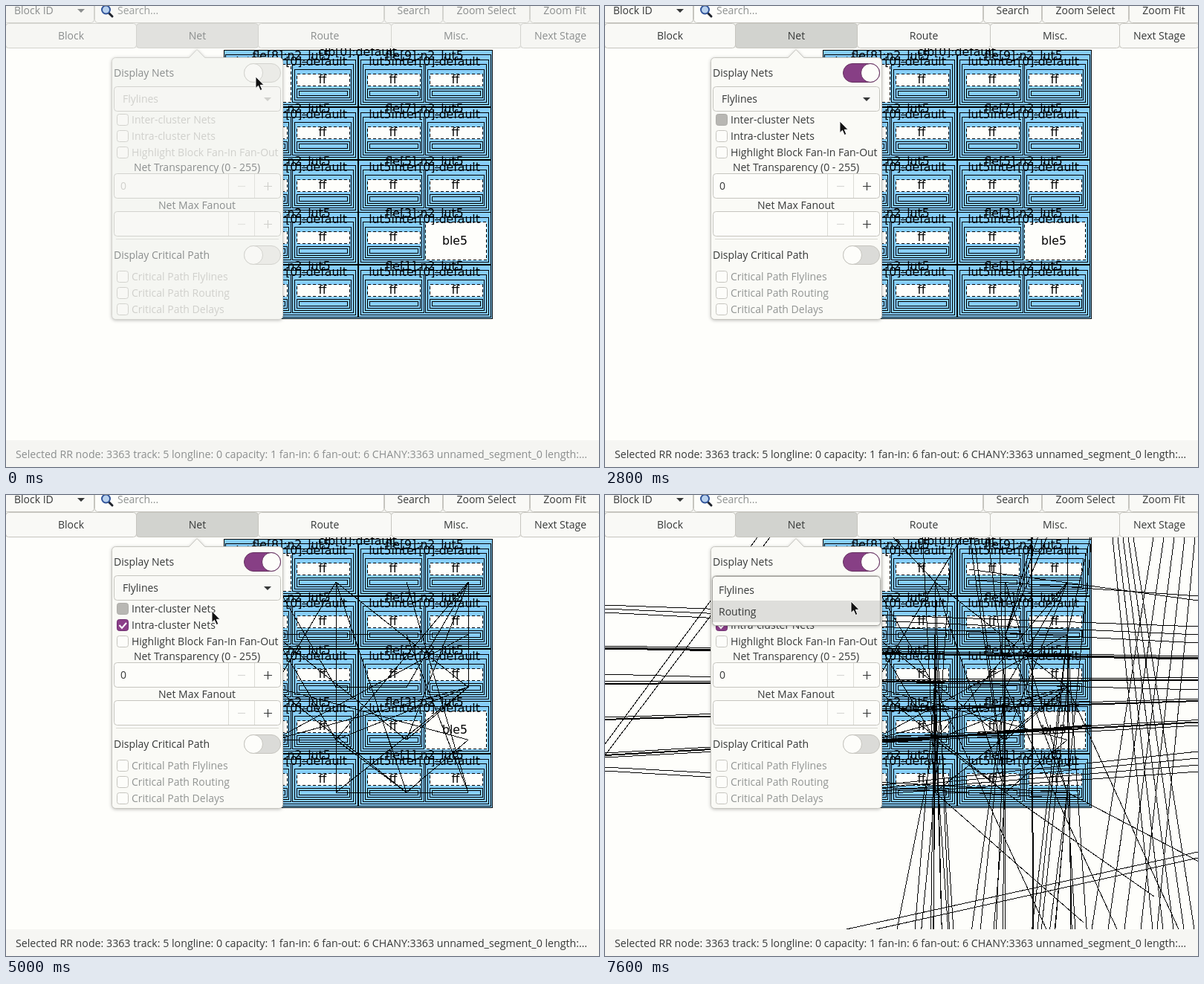
Animation, 798 px wide and 620 px high, one loop 8 s. Source, as an HTML page:

```html
<!DOCTYPE html>
<html lang="en">
<head>
<meta charset="utf-8">
<title>Net display options</title>
<style>
html, body { margin: 0; width: 100%; height: 100%; overflow: hidden; background: #fefefb; }
svg { display: block; width: 100vw; height: 100vh; }
text { font: 14px "Open Sans", "Noto Sans", sans-serif; fill: var(--fg); white-space: pre; }
.status { font-size: 14.2px; }
.block text { font: 15.7px "DejaVu Sans", sans-serif; fill: #000; text-anchor: middle; }
.block rect { fill: #87cefa; stroke: #000; }
.block .leaf { fill: #fefefb; stroke-dasharray: 4 3; }
.block rect, .wires { shape-rendering: crispEdges; }
.wires { fill: none; stroke: #000; }
.mid { text-anchor: middle; }
.bar { fill: var(--bar); }
.btn { fill: var(--btn); stroke: var(--line); }
.field { fill: var(--field); stroke: var(--line); }
.rule { stroke: var(--line); opacity: .6; }
.hint { fill: var(--hint); }
.opt { fill: var(--opt); }
.dis { fill: var(--dis); }
.sign { fill: none; stroke: var(--opt); stroke-width: 1.2; }
.faint { fill: none; stroke: var(--faint); stroke-width: 1.2; }
.arrow { fill: var(--fg); }
.shade { filter: drop-shadow(0 1px 2px rgba(0,0,0,.25)); }
</style>
</head>
<body>
<script>
const NS = 'http://www.w3.org/2000/svg';
const LOOP = 8000;

function add(parent, tag, attrs = {}, text) {
  const node = document.createElementNS(NS, tag);
  for (const key in attrs) node.setAttribute(key, attrs[key]);
  if (text !== undefined) node.textContent = text;
  parent.appendChild(node);
  return node;
}
const group = (parent, cls = '') => add(parent, 'g', { class: cls });
const path = (parent, d, cls) => add(parent, 'path', { d, class: cls });
const label = (parent, x, y, text, cls = '') => add(parent, 'text', { x, y, class: cls }, text);
const box = (parent, x, y, width, height, cls = '', rx = 0) =>
  add(parent, 'rect', { x: x + .5, y: y + .5, width, height, class: cls, rx });
const repeat = (n, fn) => { for (let i = 0; i < n; i++) fn(i); };

const svg = add(document.body, 'svg', { viewBox: '0 0 798 620', preserveAspectRatio: 'none' });
add(svg, 'rect', { width: 798, height: 620, fill: '#fefefb' });

// Nested logic blocks: two columns of five, two cells in each
const PITCH = 70.75;
const block = group(svg, 'block');

function cell(x, y, whole) {
  if (whole) {
    box(block, x, y, 82, 51, 'leaf');
    label(block, x + 40, y + 31, 'ble5');
    return;
  }
  box(block, x, y, 82, 51);
  box(block, x + 3, y + 7, 76, 41);
  box(block, x + 6, y + 13, 71, 16, 'leaf');
  box(block, x + 6, y + 33, 71, 12);
  box(block, x + 9, y + 36, 65, 6);
  label(block, x + 41, y + 26, 'ff');
}

const eachBlock = fn => repeat(10, i => fn(i % 2, i >> 1, Math.round(65 + (i >> 1) * PITCH)));

box(block, 293, 59, 361, 361);
eachBlock((col, row, y) => {
  const x = 295 + col * 179;
  box(block, x, y, 178, 70);
  box(block, x + 3, y + 7, 172, 60);
  cell(x + 6, y + 13, col === 0 && row === 0);
  cell(x + 90, y + 13, col === 1 && row === 3);
});
eachBlock((col, row, y) => {
  const x = 384 + col * 179;
  label(block, x, y + 7, `fle[${8 - 2 * row + col}]:n2_lut5`);
  label(block, x, y + 15, 'lut5inter[0]:default');
});
label(block, 473, 67, 'clb[0]:default');

// Flylines between pins and out to other clusters
let seed = 11;
const rnd = () => (seed = (seed * 16807) % 2147483647) / 2147483647;
const span = (a, b) => a + rnd() * (b - a);
const cellX = i => 361 + i * 83 + (i > 1 ? 12 : 0);
const rowY = i => 117 + i * PITCH;
const pin = (from = 0) => [cellX(from + Math.floor(rnd() * (4 - from))), rowY(Math.floor(rnd() * 5))];

const inter = group(svg, 'wires');
const intra = group(svg, 'wires');
const wire = (parent, [x1, y1], [x2, y2], w = 1) =>
  add(parent, 'line', { x1, y1, x2, y2, 'stroke-width': w });
const across = (left, right, w) => wire(inter, [0, left], [798, right], w);

repeat(4, i => {
  const left = 206 + 48 * i;
  const right = 220 + 28.5 * i;
  across(left, right, i ? 2 : 3);
  across(left - 3, right - 3);
});
repeat(3, i => across(148 + 5 * i, 177 + 11 * i));
across(241, 262);
across(353, 310);
repeat(2, i => {
  wire(inter, [0, 366 + 5 * i], [cellX(3), 400 + 8 * i]);
  wire(inter, [0, 335 + 15 * i], [205 + 17 * i, 57]);
  wire(inter, [325 + 40 * i, 584], [798, 480 + 8 * i]);
  wire(inter, [490 + 10 * i, 100 + 15 * i], [798, 142 - 6 * i]);
});
wire(inter, [373, 332], [655, 310], 3);
wire(inter, [574, 57], [576, 584], 2);

repeat(4, i => wire(inter, [373, 390 + 4 * i], [798, 345 + 9 * i]));
repeat(28, () => {
  const [x, y] = pin(1);
  wire(inter, [x, y], [Math.max(393, x + span(-55, 35)), 584]);
});
repeat(14, () => {
  const [x, y] = pin(1);
  wire(inter, [x, y], [x + span(-60, 60), 57]);
});
repeat(3, i => {
  const x = cellX(i + 1);
  wire(inter, [x, 400], [x + 200, 575 - 35 * i]);
  wire(inter, [x, 258], [x + 150, 584]);
});
repeat(5, i => {
  wire(inter, [683 + 7 * i, 57], [737 + 14 * i, 584]);
  wire(inter, [738 + 14 * i, 57], [655 + 22 * i, 584]);
});
repeat(30, () => wire(intra, pin(), pin()));

// Toolbar and status line
add(svg, 'rect', { width: 798, height: 57, class: 'bar' });
const cells = (edges, y, h, inset) => edges.slice(1).map((x, i) =>
  box(svg, edges[i], y, x - edges[i] - inset, h, 'btn', 4));
const topRow = cells([-3, 119, 509, 588, 705, 802], -10, 32, 1);
topRow[1].setAttribute('class', 'field');
const tabs = cells([-1, 175, 339, 518, 692, 799], 23, 33, 0);
tabs[1].style.fill = 'var(--tab)';
label(svg, 11, 11, 'Block ID');
path(svg, 'M96 4h10l-5 5z', 'arrow');
add(svg, 'path', { d: 'M138 9l5 5', stroke: '#20242c', 'stroke-width': 3, 'stroke-linecap': 'round' });
add(svg, 'circle', { cx: 134.5, cy: 5, r: 5.5, fill: '#b9d2ee', stroke: '#31549a', 'stroke-width': 2 });
label(svg, 150, 11, 'Search...', 'hint');

function caption(rect, y, text) {
  const mid = +rect.getAttribute('x') + rect.getAttribute('width') / 2;
  label(svg, Math.min(mid, 752), y, text, 'mid');
}
['Search', 'Zoom Select', 'Zoom Fit'].forEach((s, i) => caption(topRow[i + 2], 11, s));
['Block', 'Net', 'Route', 'Misc.', 'Next Stage'].forEach((s, i) => caption(tabs[i], 45, s));
add(svg, 'rect', { y: 584, width: 798, height: 36, class: 'bar' });
label(svg, 13, 608, 'Selected RR node: 3363 track: 5 longline: 0 capacity: 1 fan-in: 6 fan-out: 6 ' +
  'CHANY:3363 unnamed_segment_0 length:…', 'status');

// Popover
const pop = group(svg);
const sheet = path(pop, 'M147.500 69.500H246.500L257 58.500L267.500 69.500H367.500a5 5 0 0 1 5 5V416.500' +
  'a5 5 0 0 1-5 5H147.500a5 5 0 0 1-5-5V74.500a5 5 0 0 1 5-5z', 'shade');
sheet.style.cssText = 'fill:var(--pop);stroke:var(--line)';

function toggle(y, fill, edge) {
  const ring = add(pop, 'rect', { x: 318, y: y - 15, width: 54, height: 30, rx: 15,
    fill: 'none', stroke: '#e9b698', 'stroke-width': 3, opacity: 0 });
  const back = box(pop, 320, y - 13, 49, 25, '', 12.5);
  back.style.cssText = `fill:var(${fill});stroke:var(${edge})`;
  const knob = add(pop, 'circle', { cx: 333, cy: y, r: 12.5 });
  knob.style.cssText = `fill:var(--field);stroke:var(${edge})`;
  return { ring, knob };
}

function check(y, text, cls) {
  const mark = box(pop, 149, y - 8, 15, 15, 'field', 3);
  const tick = add(pop, 'path', { d: `M152.500 ${y}l3.500 4l6-7`, fill: 'none', stroke: '#fff',
    'stroke-width': 2, opacity: 0 });
  label(pop, 169, y + 5, text, cls);
  return { mark, tick };
}

function spin(y, value) {
  box(pop, 145, y - 17, 224, 33, 'field', 4);
  path(pop, `M299.500 ${y - 16}v32M334.500 ${y - 16}v32`, 'rule');
  path(pop, `M312 ${y + .5}h10`, 'faint');
  path(pop, `M347 ${y + .5}h11M352.500 ${y - 5}v11`, 'sign');
  label(pop, 154, y + 5, value, 'opt');
}

label(pop, 145, 95, 'Display Nets');
const netSwitch = toggle(90, '--track', '--edge');
box(pop, 145, 108, 224, 33, 'btn', 4);
label(pop, 157, 130, 'Flylines', 'opt');
path(pop, 'M347 123h10l-5 5z', 'opt');
const [interCheck, intraCheck] = ['Inter-cluster Nets', 'Intra-cluster Nets', 'Highlight Block Fan-In Fan-Out']
  .map((s, i) => check(153 + 22 * i, s, 'opt'));
label(pop, 257, 222, 'Net Transparency (0 - 255)', 'mid');
spin(242, '0');
label(pop, 257, 273, 'Net Max Fanout', 'mid');
spin(293, '');
path(pop, 'M148 313.500H367', 'rule');
label(pop, 145, 340, 'Display Critical Path');
toggle(335, '--off', '--line');
['Flylines', 'Routing', 'Delays'].forEach((s, i) => check(364 + 22 * i, 'Critical Path ' + s, 'dis'));

// Drop-down list
const menu = group(svg);
const list = box(menu, 144, 109, 226, 66, 'shade', 4);
list.style.cssText = 'fill:#fafaf6;stroke:#a3a29d';
const hover = add(menu, 'rect', { x: 145, width: 225, height: 29, fill: '#dededb' });
['Flylines', 'Routing'].forEach((s, i) => label(menu, 153, 133 + 29 * i, s));

const cursor = add(svg, 'path', { d: 'M0 0V15.500L3.500 12.300L6.200 18.500L8.800 17.400L6.200 11.300H11z',
  fill: '#111', stroke: '#fff', 'stroke-width': .9 });

// Pointer moves: begin, end, x, y reached
const moves = [
  [700, 1100, 380, 92], [1200, 1600, 345, 103], [1600, 1800, 338, 128], [2500, 2800, 316, 155],
  [3000, 3800, 297, 155], [4000, 4300, 275, 168], [4700, 5100, 277, 152], [6200, 6600, 345, 95],
  [6900, 7200, 333, 123], [7300, 7600, 331, 143]
];

const ramp = (t, a, b) => Math.min(1, Math.max(0, (t - a) / (b - a)));
const rgb = hex => [1, 3, 5].map(i => parseInt(hex.slice(i, i + 2), 16));
const mix = (a, b, k) => '#' + rgb(a).map((v, i) =>
  Math.round(v + (rgb(b)[i] - v) * k).toString(16).padStart(2, '0')).join('');

const place = t => moves.reduce(([x, y], [begin, end, toX, toY]) => {
  const k = ramp(t, begin, end);
  return [x + (toX - x) * k, y + (toY - y) * k];
}, [336, 95]).map(Math.round);

function paint(focus, on) {
  const tone = (a, b) => mix(a, b, focus);
  const fg = tone('#8b8e8e', '#363838');
  const dis = tone('#d0d0cc', '#929593');
  const off = tone('#ebebe7', '#dbdbd8');
  const line = tone('#d3d3ce', '#c6c5bf');
  const vars = {
    fg, dis, off, line,
    opt: mix(dis, fg, on),
    track: mix(off, '#873f85', on),
    edge: mix(line, '#65305f', on),
    hint: tone('#9b9e9d', '#8e9190'),
    faint: tone('#e2e2de', '#d8d8d4'),
    bar: tone('#f5f5f2', '#f6f6f3'),
    btn: tone('#f6f6f3', '#f9f9f6'),
    tab: tone('#e1e1de', '#d2d3cf'),
    field: tone('#f8f8f5', '#fdfdfa'),
    pop: tone('#f5f6f2', '#fafaf6')
  };
  for (const key in vars) svg.style.setProperty('--' + key, vars[key]);
}

// Grey while held down, then fading to the checked colour
function setCheck({ mark, tick }, t, press, release) {
  const k = ramp(t, release - 50, release + 150);
  const down = t >= press;
  mark.style.fill = down ? mix('#b8b7b3', '#8b3f89', k) : '';
  mark.style.stroke = down ? mix('#adaca8', '#6f2f70', k) : '';
  tick.setAttribute('opacity', down ? k * k : 0);
}

const show = (node, on) => { node.style.display = on ? '' : 'none'; };

function draw(t) {
  const first = t < 3900;
  paint(ramp(t, 700, 1000), ramp(t, 1100, 1400));
  netSwitch.knob.setAttribute('cx', 333 + 24 * ramp(t, 800, 1000));
  netSwitch.ring.setAttribute('opacity', t < 2600 ? ramp(t, 900, 1100) : 0);
  setCheck(interCheck, t, first ? 2700 : 5000, first ? 3100 : 5400);
  setCheck(intraCheck, t, 4200, 4500);
  show(inter, first ? t >= 3100 : t >= 5400);
  show(intra, t >= 4500);
  show(menu, t >= 7100);
  hover.setAttribute('y', t < 7600 ? 113 : 142);
  cursor.setAttribute('transform', `translate(${place(t)})`);
}

const start = performance.now();
let last = -1;
function tick(now) {
  const t = Math.floor((Math.max(0, now - start) % LOOP) / 100) * 100;
  if (t !== last) draw(last = t);
  requestAnimationFrame(tick);
}
draw(0);
requestAnimationFrame(tick);
</script>
</body>
</html>
```
